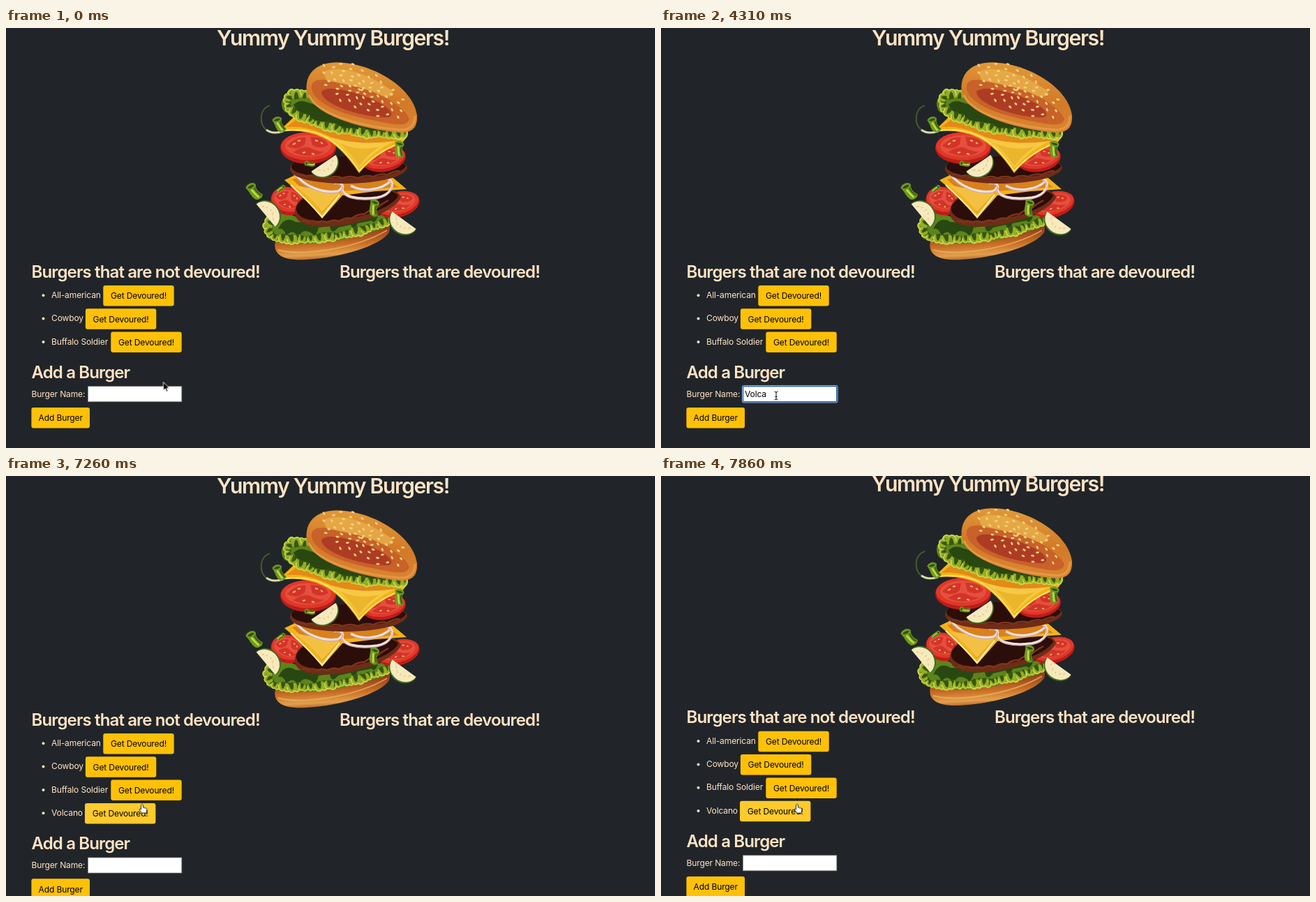
An HTML page for the animation above (8000 ms loop, 930 px wide and 602 px high).

```html
<!DOCTYPE html>
<html lang="en">
<head>
<meta charset="utf-8">
<title>Yummy Yummy Burgers!</title>
<style>
html, body { margin: 0; width: 100%; height: 100%; overflow: hidden; background: #212529; }
svg { display: block; width: 930px; height: 602px; }
text { font: 400 12.06px Inter, "Liberation Sans", sans-serif; letter-spacing: -.012em; fill: #ffe4c4; font-optical-sizing: none; }
.h1, .h2 { font-weight: 600; }
.h1 { font-size: 30.2px; letter-spacing: -.046em; text-anchor: middle; }
.h2 { font-size: 24.1px; letter-spacing: -.038em; }
.btn rect { fill: #ffc107; }
.btn text { fill: #000; text-anchor: middle; }
.menu text { font-size: 10.6px; font-weight: 500; letter-spacing: 0; fill: #f1f1f1; }
#typed text { fill: #000; }

#page, #form, #row, #focus, #caret, #menu, #typed, #typed tspan,
#pointer, #arrow, #beam, #hand, #add, #eat { animation: 8s step-end infinite; }

#page { animation-name: scroll; }
@keyframes scroll {
  0% { transform: none; }
  94.5% { transform: translateY(-1.6px); }
  96.375% { transform: translateY(-2.4px); }
  98.25%, 100% { transform: translateY(-3.2px); }
}
#form { animation-name: push; }
@keyframes push { 0% { transform: none; } 77.75%, 100% { transform: translateY(33.3px); } }
#row { animation-name: row; }
@keyframes row { 0% { visibility: hidden; } 77.75%, 100% { visibility: visible; } }

#focus { animation-name: focus; }
@keyframes focus { 0% { visibility: hidden; } 31.5% { visibility: visible; } 77.75%, 100% { visibility: hidden; } }
#caret { animation-name: caret; }
@keyframes caret { 0% { visibility: hidden; } 31.5% { visibility: visible; } 42.625%, 100% { visibility: hidden; } }
#menu { animation-name: menu; }
@keyframes menu { 0% { opacity: 0; } 35.125% { opacity: .6; } 37% { opacity: 1; } 46.375%, 100% { opacity: 0; } }

#typed { animation-name: typed; }
@keyframes typed { 0% { opacity: 1; } 77.75%, 100% { opacity: 0; } }
#typed tspan { visibility: hidden; animation-name: key; animation-delay: var(--at); }
@keyframes key { 0% { visibility: visible; } 40%, 100% { visibility: hidden; } }

#add { animation-name: add; }
@keyframes add { 0% { fill: #ffc107; } 68.625% { fill: #ffc31a; } 77.75%, 100% { fill: #ffc107; } }
#eat { animation-name: eat; }
@keyframes eat { 0% { fill: #ffc107; } 90.7%, 100% { fill: #ffca2c; } }

#pointer { animation-name: move; }
@keyframes move {
  0% { transform: translate(225.5px, 507.5px); }
  1.85% { transform: translate(225.5px, 507.5px); animation-timing-function: steps(7, start); }
  14.95% { transform: translate(194px, 524px); animation-timing-function: steps(3, start); }
  20.5% { transform: translate(182.5px, 525.5px); }
  31.5% { transform: translate(165px, 527px); }
  64.8% { transform: translate(152px, 538px); }
  66.7% { transform: translate(132px, 549px); }
  68.5% { transform: translate(112px, 561px); }
  70.3% { transform: translate(99.5px, 566px); }
  72.2% { transform: translate(98.5px, 571px); }
  73.9% { transform: translate(97.5px, 564px); }
  87.1% { transform: translate(97.5px, 564px); animation-timing-function: steps(3, start); }
  92.5%, 100% { transform: translate(195px, 470.5px); }
}
#arrow { animation-name: arrow; }
@keyframes arrow {
  0% { visibility: visible; } 31.5% { visibility: hidden; }
  64.8% { visibility: visible; } 68.5% { visibility: hidden; }
  87.1% { visibility: visible; } 90.7%, 100% { visibility: hidden; }
}
#beam { animation-name: beam; }
@keyframes beam { 0% { visibility: hidden; } 31.5% { visibility: visible; } 64.8%, 100% { visibility: hidden; } }
#hand { animation-name: hand; }
@keyframes hand {
  0% { visibility: hidden; } 68.5% { visibility: visible; }
  87.1% { visibility: hidden; } 90.7%, 100% { visibility: visible; }
}
</style>
</head>
<body>
<svg viewBox="0 0 930 602">
<defs>
  <linearGradient id="bun" x1=".55" y1="0" x2=".4" y2="1">
    <stop offset="0" stop-color="#e29a3a"/><stop offset=".5" stop-color="#d27a28"/><stop offset="1" stop-color="#dc8632"/>
  </linearGradient>
  <linearGradient id="base" x1=".4" y1="0" x2=".55" y2="1">
    <stop offset=".3" stop-color="#93401b"/><stop offset=".62" stop-color="#c96f26"/><stop offset=".85" stop-color="#e2a04c"/><stop offset="1" stop-color="#a9561f"/>
  </linearGradient>
  <g id="button" class="btn"><rect width="101.4" height="29.5" rx="3"/><text x="50.7" y="19.3">Get Devoured!</text></g>
  <g id="slice">
    <path d="M-22 0A22 20 0 0 0 22 0Z" fill="#3f6b1d"/>
    <path d="M-21 -1A20 18 0 0 0 21 -1Z" fill="#f6e9bd"/>
    <path d="M-12 3l3 2M-6 7l2 3M1 8v3M8 6l-1 3M14 3l-3 2" stroke="#e0c878" stroke-width="1.3"/>
  </g>
  <g id="pepper">
    <path d="M-8 -8C-4 -13 5 -12 6 -7C3 -2 5 4 9 8C8 13 -1 14 -3 9C-6 5 -5 -2 -8 -8Z" fill="#6f9a1f"/>
    <path d="M-6 -7C-2 -9 2 -9 4 -7C0 -4 -3 -5 -6 -7Z" fill="#2d4d12"/>
    <path d="M-2 -3C0 1 0 5 3 10" fill="none" stroke="#c9d948" stroke-width="2.4"/>
    <path d="M3 -4C2 1 4 5 7 9" fill="none" stroke="#35570f" stroke-width="1.6"/>
  </g>
  <g id="tomato">
    <ellipse rx="40" ry="23" fill="#bd1d17"/>
    <ellipse cy="-2.5" rx="39" ry="20" fill="#e0372a"/>
    <ellipse cy="-3" rx="33" ry="15.5" fill="#e5503d"/>
    <path d="M-30 -3Q-18 -17 -3 -15L-5 -5Q-16 5 -30 -3ZM3 -16Q24 -16 29 -5Q20 3 6 -4ZM-22 6Q-5 -4 3 0Q14 6 24 5Q3 17 -22 6Z" fill="#d3342a"/>
    <path d="M-22 -5l4 -2M-15 -10l4 -1M10 -11l4 1M18 -8l3 2M-8 7l4 -1M5 8l4 1" stroke="#f5b860" stroke-width="2"/>
  </g>
  <g id="curl">
    <path d="M-9 -6C-11 4 -5 8 0 4C4 9 11 4 9 -6Z" fill="#94ad25"/>
    <path d="M-6 -7Q-5 3 -2 2Q1 -2 0 -8ZM3 -8Q6 -3 4 2Q8 0 8 -7Z" fill="#36560f"/>
    <path d="M-9 -3C-9 5 -4 7 0 4C4 8 9 4 9 -3" fill="none" stroke="#ccd94a" stroke-width="1.7"/>
  </g>
</defs>

<rect width="930" height="602" fill="#212529"/>
<g id="page">
  <text class="h1" x="468.5" y="25.3">Yummy Yummy Burgers!</text>

  <g id="burger">
    <!-- bottom bun and lettuce -->
    <path d="M386 306C382 324 396 334 430 332C482 329 536 312 549 293C553 282 546 274 536 276L400 296Z" fill="url(#base)"/>
    <path d="M390 318C420 328 500 317 546 290" fill="none" stroke="#efb765" stroke-width="2" opacity=".7"/>
    <path d="M376 302C372 286 380 270 392 266C404 262 420 274 430 278L540 268C550 274 548 284 540 288C510 296 480 306 450 308C420 312 390 308 376 302Z" fill="#5d831c"/>
    <path d="M390 288q8 -3 12 10q8 -12 18 2q4 -14 18 -6q6 8 10 -8l16 -2q2 14 12 2l18 -4q4 10 10 -2l20 -4q4 6 9 -6q-60 12 -118 8q-16 -10 -25 10Z" fill="#294711"/>
    <path class="frill" d="M380 268C372 284 374 297 384 301C420 308 490 302 542 280"/>

    <!-- lower layers -->
    <use href="#tomato" transform="translate(404 248) rotate(12) scale(.62 .88)"/>
    <use href="#tomato" transform="translate(562 253) rotate(-14) scale(.78 .8)"/>
    <path d="M414 262C416 238 450 229 490 229C535 226 562 230 566 242C562 258 520 279 470 284C434 287 412 280 414 262Z" fill="#6f2c17"/>
    <path d="M416 258C420 240 455 232 495 231C540 229 560 234 562 241C552 257 515 272 470 276C436 279 415 272 416 258Z" fill="#2b0d0a"/>
    <path d="M424 277q5 -3 9 2q7 -5 12 0q9 -4 15 0q9 -6 17 -2q10 -6 18 -4q10 -7 18 -6q9 -7 17 -8q8 -7 18 -12" fill="none" stroke="#7c3519" stroke-width="2.5"/>
    <path d="M399 218L422 207L555 215L574 231L530 234L482 240L453 273Q428 241 399 218Z" fill="#f5b21a"/>
    <path d="M410 217L430 212L545 217L562 228L480 234L453 265Q434 238 410 217Z" fill="#d9811c"/>
    <path d="M412 225Q436 230 478 236L453 264Q434 240 412 225Z" fill="#f4c043"/>
    <path d="M408 225Q434 249 453 271L478 239" fill="none" stroke="#fff0a0" stroke-width="2.2"/>
    <g fill="none" stroke="#f3e2e2" stroke-width="3.6">
      <path id="rings" d="M413 208C426 226 452 238 476 234C488 227 480 220 470 222M483 226C476 242 505 247 532 243C552 239 559 224 548 216M494 226C510 235 536 234 552 219"/>
      <use href="#rings" y="1.8" stroke="#cfa7a6" stroke-width="1.2"/>
    </g>

    <!-- upper layers -->
    <path d="M407 202C408 186 445 181 490 184C540 184 572 188 575 200C572 214 535 222 490 223C440 223 408 215 407 202Z" fill="#6f2c17"/>
    <path d="M409 199C412 184 450 183 490 184C540 185 570 190 573 198C566 210 530 214 490 215C445 216 410 209 409 199Z" fill="#2b0d0a"/>
    <path d="M416 211q8 -3 13 2q9 -4 15 1q10 -3 18 1q11 -4 20 0q12 -4 22 0q12 -5 22 -2q12 -5 20 -3q10 -5 18 -5" fill="none" stroke="#7c3519" stroke-width="2.3"/>
    <use href="#tomato" transform="translate(433 172)"/>
    <use href="#tomato" transform="translate(541 187) rotate(-8) scale(.8 .83)"/>
    <path d="M390 149L412 128L450 130L573 158L567 166Q532 177 506 208Q480 169 454 157Q425 144 390 149Z" fill="#f6b315"/>
    <path d="M402 142L416 131L460 138L562 160Q529 171 506 199Q482 163 456 152Q427 139 402 142Z" fill="#e38a17"/>
    <path d="M456 153Q497 170 558 162Q529 174 506 201Q484 167 456 153Z" fill="#f6c843"/>
    <path d="M478 165Q508 178 535 170Q518 182 506 198Q494 179 478 165Z" fill="#ebb52c"/>
    <path d="M394 148Q430 141 460 157Q486 173 506 205Q529 179 562 166" fill="none" stroke="#ffe878" stroke-width="1.8"/>
    <path d="M399 120C390 108 398 94 408 92C418 86 430 90 434 96L470 112L566 148C560 158 530 156 496 152C460 148 420 132 399 120Z" fill="#5d831c"/>
    <path d="M412 110q8 -8 18 -4l26 8l104 36q-14 2 -20 -2q-24 6 -50 0q-40 -4 -58 -18q-9 0 -20 -20Z" fill="#294711"/>
    <path class="frill" d="M426 94C404 90 396 104 406 118C430 136 490 156 566 153"/>

    <!-- top bun -->
    <path d="M431 92C427 60 452 46 485 50C535 55 585 90 589 125C590 143 582 150 565 150C520 146 440 128 431 92Z" fill="url(#bun)"/>
    <path d="M438 88C436 74 448 72 466 76C512 82 566 104 578 130C576 141 560 139 545 136C500 128 446 115 438 88Z" fill="#c8612a"/>
    <path d="M452 92C456 82 490 88 520 100C546 110 560 124 548 128C520 130 454 112 452 92Z" fill="#ad3c24"/>
    <path d="M455 63C475 51 520 65 552 89C560 97 548 101 536 96C508 82 480 82 459 74Z" fill="#e9b24c" opacity=".75"/>
    <path d="M434 96C446 126 520 143 566 146C580 146 586 138 586 126" fill="none" stroke="#e8a04a" stroke-width="3" opacity=".75"/>
    <g id="seeds" transform="translate(508 93) rotate(27)" fill="#f5d17c"></g>

    <!-- loose pieces -->
    <path d="M378 111C363 116 362 137 373 146" fill="none" stroke="#45622c" stroke-width="1.8"/>
    <path d="M373 146C380 151 388 151 397 148" fill="none" stroke="#d5dda0" stroke-width="3"/>
    <use href="#slice" transform="translate(455.5 194.5) rotate(-34)"/>
    <use href="#slice" transform="translate(373 268) rotate(230)"/>
    <use href="#slice" transform="translate(570 276.5) rotate(36)"/>
    <use href="#pepper" transform="translate(355 234) rotate(-24) scale(1.1)"/>
    <use href="#pepper" transform="translate(391 138) rotate(-14)"/>
    <use href="#pepper" transform="translate(563 173) rotate(14)"/>
    <use href="#pepper" transform="translate(527 257) rotate(20)"/>
    <use href="#pepper" transform="translate(435 195) rotate(-70) scale(.55 .65)"/>
    <use href="#pepper" transform="translate(394 230) rotate(65) scale(.45 .6)"/>
  </g>

  <text class="h2" x="36.5" y="357.6">Burgers that are not devoured!</text>
  <text class="h2" x="478" y="357.6">Burgers that are devoured!</text>

  <g fill="#ffe4c4">
    <circle cx="53.5" cy="383.3" r="2"/><text x="65" y="387">All-american</text>
    <circle cx="53.5" cy="416.6" r="2"/><text x="65" y="420.3">Cowboy</text>
    <circle cx="53.5" cy="449.9" r="2"/><text x="65" y="453.6">Buffalo Soldier</text>
  </g>
  <use href="#button" x="139.3" y="369"/>
  <use href="#button" x="113.9" y="402.3"/>
  <use href="#button" x="150.3" y="435.6"/>
  <g id="row">
    <circle cx="53.5" cy="483.2" r="2" fill="#ffe4c4"/><text x="65" y="486.9">Volcano</text>
    <g class="btn" transform="translate(113 468.9)"><rect id="eat" width="101.4" height="29.5" rx="3"/><text x="50.7" y="19.3">Get Devoured!</text></g>
  </g>

  <g id="form">
    <text class="h2" x="36.5" y="501.5">Add a Burger</text>
    <text x="36.5" y="529">Burger Name:</text>
    <rect x="117.4" y="513.7" width="134.4" height="22" fill="#fff" stroke="#858585" stroke-width=".8"/>
    <g id="focus" fill="none">
      <rect x="116.5" y="512.6" width="136.4" height="24.2" rx="2" stroke="#dfe9f7" stroke-width="1"/>
      <rect x="117.5" y="513.6" width="134.4" height="22.2" rx="1" stroke="#1f5fb8" stroke-width="1.5"/>
    </g>
    <path id="caret" d="M120.6 518.5V531.5" stroke="#000" stroke-width=".9"/>
    <g id="typed"><text x="120" y="529"><tspan style="--at:3.71s">V</tspan><tspan style="--at:4.01s">o</tspan><tspan style="--at:4.31s">l</tspan><tspan style="--at:4.31s">c</tspan><tspan style="--at:4.31s">a</tspan><tspan style="--at:4.6s">n</tspan><tspan style="--at:4.75s">o</tspan></text></g>
    <g class="btn"><rect id="add" x="36.4" y="544" width="83.6" height="29.5" rx="3"/><text x="78.2" y="563.3">Add Burger</text></g>
  </g>

  <g id="menu" class="menu">
    <rect x="117" y="538" width="149" height="70" fill="#27292c"/>
    <text x="126" y="562">narmu</text>
    <text x="126" y="590">velty</text>
  </g>
</g>

<g id="pointer">
  <path id="arrow" d="M0 0V12L2.8 9.4L4.6 13.6L6.6 12.8L4.8 8.8H8.6Z" fill="#000" stroke="#fff" stroke-width=".9"/>
  <path id="beam" d="M-2.5 -6Q0 -6 0 -4V4Q0 6 -2.5 6M2.5 -6Q0 -6 0 -4M0 4Q0 6 2.5 6M-1.5 1.5H1.5" fill="none" stroke="#111" stroke-width="1"/>
  <path id="hand" d="M-1.4 1Q0 -1.6 1.4 1V4.6L5.6 5.6Q7.2 6.2 7 8L6 12.6H-.4L-3.6 8.2Q-4.4 5.8 -1.4 7.2Z" fill="#fff" stroke="#111" stroke-width=".9"/>
</g>
</svg>
<script>
function make(tag, attrs) {
  const el = document.createElementNS('http://www.w3.org/2000/svg', tag);
  for (const name in attrs) el.setAttribute(name, attrs[name]);
  return el;
}

// lettuce curls set side by side along each edge, facing outward
for (const edge of document.querySelectorAll('.frill')) {
  const length = edge.getTotalLength(), count = Math.round(length / 13);
  edge.setAttribute('fill', 'none');
  for (let i = 0; i <= count; i++) {
    const at = length * i / count;
    const p = edge.getPointAtLength(at);
    const a = edge.getPointAtLength(Math.max(0, at - 3)), b = edge.getPointAtLength(at + 3);
    const turn = Math.atan2(b.y - a.y, b.x - a.x) * 180 / Math.PI + 14 * Math.sin(i * 2.3);
    const size = .9 + .2 * Math.sin(i * 1.7);
    edge.before(make('use', { href: '#curl', transform: `translate(${p.x} ${p.y}) rotate(${turn}) scale(${size})` }));
  }
}

// sesame seeds on a golden-angle spiral
const seeds = document.getElementById('seeds');
for (let i = 0; i < 64; i++) {
  const r = Math.pow(i / 64, .65), a = i * 2.39996;
  const x = 70 * r * Math.cos(a), y = 30 * r * Math.sin(a) - 5;
  seeds.append(make('ellipse', { rx: 2.5, ry: 1.4, transform: `translate(${x} ${y}) rotate(${i * 47 % 90 - 45})` }));
}
</script>
</body>
</html>
```
